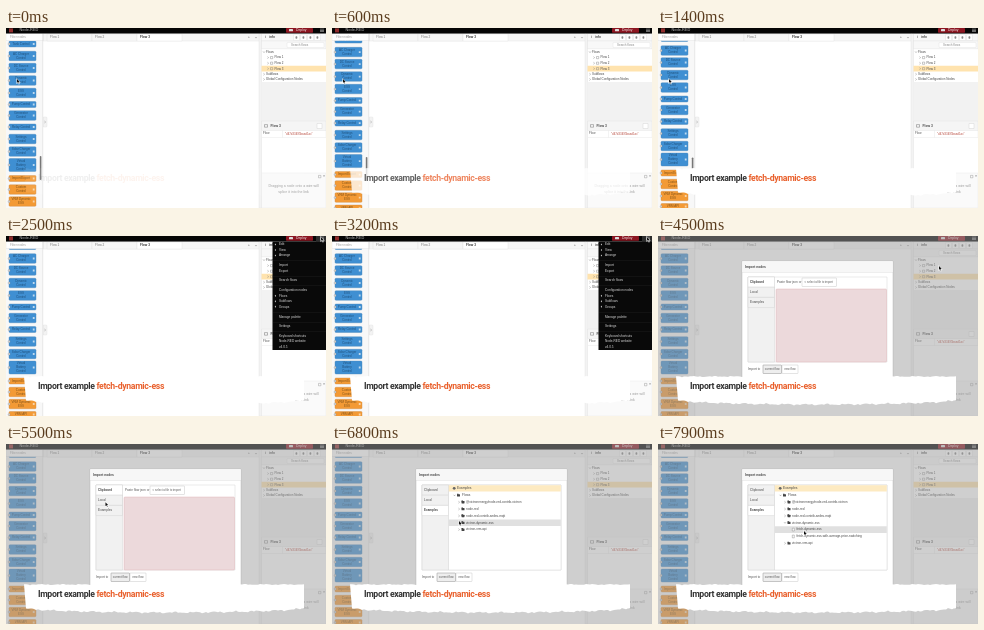
Animation, 320 px wide and 180 px high, one loop 8000 ms. Source, as an HTML page with a canvas:

```html
<!DOCTYPE html>
<html lang="en">
<head>
<meta charset="utf-8">
<title>Import example flow</title>
<style>
  html, body { margin: 0; width: 100%; height: 100%; overflow: hidden; background: #fff; }
  canvas { display: block; width: 100vw; height: 100vh; }
</style>
</head>
<body>
<canvas id="stage"></canvas>
<script>
const W = 320, H = 180, LOOP = 8000;
const BAR = 5.5;
const canvas = document.getElementById('stage');
const ctx = canvas.getContext('2d');
const SANS = '"Liberation Sans", Arial, sans-serif';

const clamp = (v) => Math.max(0, Math.min(1, v));
const ease = (t, from, to) => {
  const p = clamp((t - from) / (to - from));
  return p * p * (3 - 2 * p);
};

function rect(x, y, w, h, fill, stroke, radius = 0) {
  ctx.beginPath();
  ctx.roundRect(x, y, w, h, radius);
  if (fill) { ctx.fillStyle = fill; ctx.fill(); }
  if (stroke) { ctx.strokeStyle = stroke; ctx.lineWidth = 0.4; ctx.stroke(); }
}

function text(str, x, y, { size = 3.2, color = '#555', weight = 400, align = 'left', font = SANS } = {}) {
  ctx.font = `${weight} ${size}px ${font}`;
  ctx.fillStyle = color;
  ctx.textAlign = align;
  ctx.textBaseline = 'middle';
  ctx.fillText(str, x, y);
}

function poly(points, fill) {
  ctx.beginPath();
  points.forEach(([x, y]) => ctx.lineTo(x, y));
  ctx.closePath();
  ctx.fillStyle = fill;
  ctx.fill();
}

function chevron(x, y, open, color = '#777') {
  ctx.beginPath();
  if (open) { ctx.moveTo(x - 0.9, y - 0.5); ctx.lineTo(x, y + 0.5); ctx.lineTo(x + 0.9, y - 0.5); }
  else { ctx.moveTo(x - 0.5, y - 0.9); ctx.lineTo(x + 0.5, y); ctx.lineTo(x - 0.5, y + 0.9); }
  ctx.strokeStyle = color;
  ctx.lineWidth = 0.5;
  ctx.stroke();
}

// ---------- editor ----------
// Center, height and label lines of each palette node.
const paletteNodes = [
  [16, 6, 'Tank Control'], [28, 9.5, 'AC Charger', 'Control'], [40, 9.5, 'DC Source', 'Control'],
  [52.5, 9.5, 'Dynamic', 'Control'], [65, 9.5, 'ESS', 'Control'], [76.5, 6, 'Pump Control'],
  [87.5, 9.5, 'Generator', 'Control'], [99, 6, 'Relay Control'], [111, 9.5, 'Settings', 'Control'],
  [123.5, 9.5, 'Solar Charger', 'Control'], [137, 13, 'Virtual', 'Battery', 'Control'],
  [150.5, 6, 'Import Export'], [161.5, 9.5, 'Custom', 'Control'], [173.5, 9.5, 'VRM Dynamic', 'ESS'],
  [184, 6, 'VRM API']
];

function palette(t) {
  const scroll = 5.5 * ease(t, 50, 900);
  rect(0, BAR, 37, H - BAR, '#f8f8f8');
  ctx.save();
  ctx.beginPath();
  ctx.rect(0, 12.5, 37, 168);
  ctx.clip();
  for (const [y, h, ...lines] of paletteNodes) {
    const top = y - scroll - h / 2;
    const orange = y > 145;
    rect(3, top, 27, h, orange ? '#f39a35' : '#3f8fd2', orange ? '#c98a42' : '#4a86b8', 1);
    rect(26.8, top + h / 2 - 0.9, 1.8, 1.8, orange ? '#f8d3a6' : '#bcd9ef');
    rect(2.2, top + h / 2 - 0.9, 1.8, 1.8, '#ddd', '#999', 0.5);
    lines.forEach((line, i) =>
      text(line, 15, top + h / 2 + (i - (lines.length - 1) / 2) * 4,
        { size: 3, align: 'center', color: orange ? '#7d5018' : '#1f4f7a' }));
  }
  ctx.restore();
  ctx.globalAlpha = 1 - ease(t, 1500, 1900);
  rect(33.8, 128 + 1.5 * ease(t, 50, 900), 1.6, 24, '#777', null, 0.8);
  ctx.globalAlpha = 1;
  rect(0, BAR, 37, 7, '#fff', '#ddd');
  text('Filter nodes', 4, 9.6, { size: 3, color: '#999' });
  rect(36.7, BAR, 0.4, H - BAR, '#ccc');
}

function workspace() {
  rect(37, BAR, 217, H - BAR, '#fff');
  rect(37, BAR, 217, 7.5, '#f6f6f6', '#ddd');
  ['Flow 1', 'Flow 2', 'Flow 3'].forEach((name, i) => {
    const active = i === 2;
    rect(41 + i * 45, 6, 45, 7, active ? '#fff' : '#f7f7f7', '#ddd');
    text(name, 44 + i * 45, 9.6, { weight: active ? 700 : 400, color: active ? '#333' : '#777' });
  });
  text('+', 242, 9.6);
  chevron(250, 9.6, true);
  rect(37, 89, 4, 10, '#f3f3f3', '#ddd', 1);
  chevron(39, 94, false);
}

function sidebar() {
  rect(253, BAR, 67, H - BAR, '#fff');
  rect(253, BAR, 2.5, H - BAR, '#f3f3f3', '#ddd');
  rect(255.5, BAR, 64.5, 7.5, '#f8f8f8', '#ddd');
  text('i', 259, 9.6, { weight: 700 });
  text('info', 263, 9.6, { weight: 700, color: '#444' });
  [290, 297, 304, 311].forEach((x) => {
    rect(x - 2.5, 6.5, 6, 6, '#fff', '#ddd');
    rect(x - 0.5, 8.2, 1.8, 2.6, '#888', null, 0.7);
  });
  rect(255.5, 13, 64.5, 7.7, '#f8f8f8', '#ddd');
  rect(281, 14.4, 37, 5.2, '#fff', '#ddd', 1);
  text('Search flows', 285, 17, { size: 3, color: '#888' });
  rect(255.5, 37.8, 64.5, 5.6, '#ffe3ae');
  rect(255.5, 54, 64.5, 39, '#f2f2f2');
  const tree = [['Flows', 260, 24], ['Flow 1', 268.5, 29.6], ['Flow 2', 268.5, 35.2], ['Flow 3', 268.5, 40.7],
    ['Subflows', 260, 46.2], ['Global Configuration Nodes', 260, 51.4]];
  tree.forEach(([label, x, y], i) => {
    chevron(x === 260 ? 258 : 262, y, i === 0);
    if (x > 260) rect(264.5, y - 1.1, 2.2, 2.2, null, '#777');
    text(label, x, y, { size: 3, color: '#444' });
  });
  rect(255.5, 93, 64.5, 9.5, '#f5f5f5', '#ddd');
  rect(258.5, 96.6, 3, 2.6, null, '#555');
  text('Flow 3', 264.5, 98, { size: 3.3, weight: 700, color: '#444' });
  rect(311, 95.5, 5, 5, '#fff', '#ccc');
  rect(255.5, 102.5, 64.5, 7, '#fff', '#e2e2e2');
  rect(276, 102.5, 0.4, 7, '#e2e2e2');
  text('Flow', 257, 105.6, { size: 3.1 });
  text('"d47d33495baad1ac"', 279, 105.8, { size: 2.9, color: '#b84b3f' });
  rect(255.5, 145, 64.5, 35, '#fafafa', '#e2e2e2');
  rect(312.5, 147.4, 2.4, 2.4, null, '#888');
  text('×', 317, 148.5, { size: 3.5 });
  text('Dragging a node onto a wire will', 287.5, 158.5, { size: 3.5, color: '#999', align: 'center' });
  text('splice it into the link', 287.5, 164, { size: 3.5, color: '#999', align: 'center' });
}

function header(menuOpen) {
  rect(0, 0, W, BAR, '#050505');
  rect(3, 0.4, 4, 4, '#8f2c2c');
  text('Node-RED', 13.5, 2.3, { size: 3.9, color: '#bbb' });
  rect(280, 0, 27, 4.8, '#8c1621', null, 0.7);
  rect(283, 1.1, 4, 2.2, '#ddd', null, 0.5);
  text('Deploy', 290, 2.2, { size: 3.4, color: '#eee' });
  if (menuOpen) rect(310, 0, 10, BAR, '#2c2c2c');
  for (let i = 0; i < 3; i++) rect(314, 0.8 + i * 1.3, 4, 0.5, '#ccc');
}

function menu(hoverImport) {
  rect(266.5, BAR, 53.5, 114 - BAR, '#090909');
  if (hoverImport) rect(267, 26.6, 53, 5.6, '#383838');
  const items = [['Edit', 8.5, 1], ['View', 14, 1], ['Arrange', 19.5, 1], ['Import', 29.3], ['Export', 34.8],
    ['Search flows', 44.6], ['Configuration nodes', 54.3], ['Flows', 59.8, 1], ['Subflows', 65.3, 1], ['Groups', 70.7, 1],
    ['Manage palette', 80.8], ['Settings', 90.5], ['Keyboard shortcuts', 100], ['Node-RED website', 105.5], ['v4.0.5', 110.8]];
  for (const [label, y, submenu] of items) {
    text(label, 273, y, { size: 3.15, color: '#ddd' });
    if (submenu) poly([[270, y - 1.1], [268.7, y], [270, y + 1.1]], '#ccc');
  }
  [24.5, 40, 49.5, 76, 86, 95.5].forEach((y) => rect(267, y, 53, 0.3, '#2c2c2c'));
}

// ---------- import dialog ----------
function clipboardPane() {
  text('Paste flow json or', 119, 46.3, { size: 3.1 });
  rect(144, 42, 34.5, 8.5, '#fff', '#bbb', 0.5);
  text('⇪ select a file to import', 146, 46.3, { size: 2.8 });
  rect(118, 53, 110.5, 73, '#ecd9db', '#d8a9ad', 1);
}

function folder(x, y) {
  rect(x, y - 1.1, 3, 2.4, '#444', null, 0.4);
  rect(x, y - 1.6, 1.5, 1, '#444');
}

function examplesPane(expanded, hoverRow) {
  const rows = [['@victronenergy/node-red-contrib-victron'], ['node-red'], ['node-red-contrib-aedes-mqtt'], ['victron-dynamic-ess']];
  if (expanded) rows.push(['fetch-dynamic-ess', true], ['fetch-dynamic-ess-with-average-price-switching', true]);
  rows.push(['victron-vrm-api']);

  rect(116.5, 41, 112.5, 85, '#fff', '#ccc');
  rect(116.8, 41.3, 112, 6.2, '#fdeac1');
  rect(120.8, 42.9, 2.8, 2.8, '#666', null, 1.4);
  text('Examples', 125, 44.4, { size: 3.3, color: '#444' });
  chevron(122.5, 51.3, true);
  folder(125, 51.3);
  text('Flows', 130, 51.3, { size: 3.2, color: '#444' });
  rows.forEach(([label, file], i) => {
    const y = 58.2 + i * 6.85;
    if (i === hoverRow) rect(116.8, y - 3.3, 112, 6.6, '#e0e0e0');
    if (file) rect(134.3, y - 1.4, 2, 2.8, '#fff', '#777');
    else { chevron(127, y, expanded && i === 3); folder(129.5, y); }
    text(label, file ? 138.5 : 134, y, { size: 3.1, color: '#444' });
  });
}

function dialog(t) {
  const examples = t >= 6100;
  const expanded = t >= 7000;
  rect(0, 0, W, H, 'rgba(160,160,160,0.5)');
  rect(84, 25, 151, 130, '#fff', '#aaa', 0.5);
  rect(84.3, 25.3, 150.4, 10.7, '#f7f7f7');
  rect(84, 36, 151, 0.4, '#ddd');
  text('Import nodes', 87, 30.8, { size: 3.3, weight: 700, color: '#444' });

  rect(90, 41, 139, 85, '#fff', '#ccc');
  rect(90, 41, 26.5, 85, '#f1f1f1', '#ccc');
  ['Clipboard', 'Local', 'Examples'].forEach((tab, i) => {
    const active = i === (examples ? 2 : 0);
    rect(90, 41 + i * 10.2, 26.5, 10.2, active ? '#fff' : '#f1f1f1', '#ccc');
    text(tab, 92, 46.2 + i * 10.2, { size: active ? 3 : 3.2, weight: active ? 700 : 400, color: '#444' });
  });
  if (examples) examplesPane(expanded, t < 6500 ? -1 : t < 7400 ? 3 : 4);
  else clipboardPane();

  text('Import to', 90, 133.2, { size: 3.1 });
  rect(105, 129, 18.5, 8.5, '#eee', '#777', 0.5);
  text('current flow', 114.2, 133.2, { size: 2.9, align: 'center' });
  rect(124, 129, 16, 8.5, '#fff', '#bbb', 0.5);
  text('new flow', 132, 133.2, { size: 2.9, align: 'center' });
}

// ---------- pointer and caption ----------
// Time, x and y of the pointer's resting points.
const pointerPath = [[0, 11, 51], [1500, 11, 51], [2200, 315, 1], [3300, 315, 1], [3900, 281, 30],
  [4500, 281, 30], [5200, 117, 54], [5700, 90, 60.5], [5900, 90, 60.5], [6050, 99, 66], [6150, 99, 66],
  [6600, 127, 77], [7200, 127, 77], [7700, 146, 87], [8000, 146, 87]];

function pointer(t) {
  const next = pointerPath.findIndex((p) => p[0] > t);
  const [t0, x0, y0] = pointerPath[next - 1], [t1, x1, y1] = pointerPath[next];
  const p = ease(t, t0, t1);
  ctx.save();
  ctx.translate(x0 + (x1 - x0) * p, y0 + (y1 - y0) * p);
  poly([[-0.5, -0.9], [-0.5, 4.9], [0.8, 3.9], [1.8, 5.6], [2.8, 5.1], [2, 3.5], [3.7, 3.4]], '#fff');
  poly([[0, 0], [0, 3.9], [0.9, 3], [1.8, 4.8], [2.2, 4.6], [1.4, 2.9], [2.7, 2.8]], '#111');
  ctx.restore();
}

function tornPaper() {
  const rough = (x) => 0.5 * Math.sin(x * 0.31) + 0.4 * Math.sin(x * 0.83 + 1) + 0.3 * Math.sin(x * 1.9);
  const points = [];
  for (let x = 18; x <= 299; x += 2) points.push([x, 140.5 + rough(x) * 0.6]);
  for (let x = 298; x >= 20; x -= 2) {
    const middle = Math.sin(Math.PI * (x - 20) / 278);
    points.push([x, 164 + 4.5 * Math.sqrt(Math.max(0, middle)) + rough(x + 70)]);
  }
  return points;
}
const paper = tornPaper();

function caption(t) {
  ctx.save();
  ctx.globalAlpha = 0.08 + 0.92 * ease(t, 0, 900);
  poly(paper, '#fff');
  const style = { size: 8.7, weight: 700, font: 'Roboto, Arial, sans-serif' };
  ctx.letterSpacing = '-0.35px';
  text('Import example ', 32, 150.5, { ...style, color: '#333' });
  const width = ctx.measureText('Import example ').width;
  text('fetch-dynamic-ess', 32 + width, 150.5, { ...style, color: '#e9602c' });
  ctx.restore();
}

function draw(t) {
  const menuOpen = t >= 2500 && t < 4400;
  workspace();
  palette(t);
  sidebar();
  header(menuOpen);
  if (menuOpen) menu(t >= 3700);
  if (t >= 4500) dialog(t);
  pointer(t);
  caption(t);
}

function frame(now) {
  const scale = window.devicePixelRatio || 1;
  const w = Math.round(innerWidth * scale), h = Math.round(innerHeight * scale);
  if (canvas.width !== w || canvas.height !== h) { canvas.width = w; canvas.height = h; }
  ctx.setTransform(w / W, 0, 0, h / H, 0, 0);
  draw(now % LOOP);
  requestAnimationFrame(frame);
}
requestAnimationFrame(frame);
</script>
</body>
</html>
```
